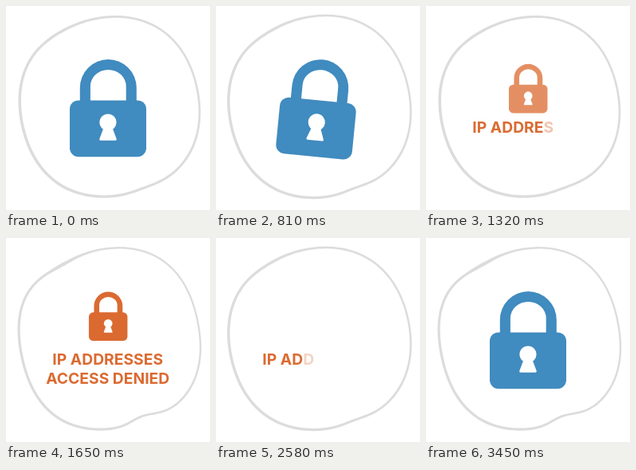
Recreate the animation shown at these times as an HTML page with a canvas. Size 256 px wide and 256 px high, loop 3.48 s.

```html
<!DOCTYPE html>
<html lang="en">
<head>
<meta charset="utf-8">
<title>Access denied</title>
<style>
  html, body { margin: 0; width: 100%; height: 100%; overflow: hidden; background: #fff; }
  canvas { display: block; width: 256px; height: 256px; }
</style>
</head>
<body>
<canvas id="stage"></canvas>
<script>
const LOOP = 3480;
const BLUE = '#408bbf', ORANGE = '#db6a31', GREY = '#dcdcdd';
const LINES = ['IP ADDRESSES', 'ACCESS DENIED'];
const TOTAL = LINES.join('').length;

const canvas = document.getElementById('stage');
const ctx = canvas.getContext('2d');
const dpr = window.devicePixelRatio || 1;
canvas.width = canvas.height = 256 * dpr;

const clamp = v => Math.max(0, Math.min(1, v));
const ramp = (t, a, b) => clamp((t - a) / (b - a));
const rad = deg => deg * Math.PI / 180;
const bump = (deg, at, spread) => Math.exp(-(((deg - at) / spread) ** 2) / 2);

// Four wobbly rings: size, lobe height, depth of the lower right and upper left dents
const rings = [
  { size: 114, lobe: 2, low: 2, high: 1.5, width: 3.1 },
  { size: 115.5, lobe: 2, low: 3, high: 2, width: 3 },
  { size: 115.5, lobe: 2, low: 7, high: 7, width: 3 },
  { size: 115.5, lobe: 3, low: 8, high: 5, width: 2.8 }
];

function drawRing({ size, lobe, low, high, width }) {
  const radius = deg => size
    + lobe * Math.cos(rad(4 * (deg - 33)))
    + 1.3 * Math.cos(rad(deg + 30))
    - low * bump(deg, 66, 9)
    - high * bump(deg, 235, 13);
  const half = deg => (width + 0.5 * Math.cos(rad(deg - 150)) + 0.3 * high * bump(deg, 238, 8)) / 2;

  ctx.beginPath();
  for (const side of [1, -1]) {
    for (let deg = 0; deg < 360; deg += 2) {
      const r = radius(deg) + side * half(deg);
      const x = 129 + r * Math.cos(rad(deg)), y = 127 + r * Math.sin(rad(deg));
      deg ? ctx.lineTo(x, y) : ctx.moveTo(x, y);
    }
    ctx.closePath();
  }
  ctx.fillStyle = GREY;
  ctx.fill('evenodd');
}

function mix(hex, a) {
  const part = i => Math.round(255 + (parseInt(hex.slice(i, i + 2), 16) - 255) * a);
  return `rgb(${part(1)},${part(3)},${part(5)})`;
}

function arch(x, y, rx, ry) {
  ctx.moveTo(x - rx, -5);
  ctx.lineTo(x - rx, y);
  ctx.ellipse(x, y, rx, ry, 0, Math.PI, 2 * Math.PI);
  ctx.lineTo(x + rx, -5);
  ctx.closePath();
}

// Padlock centred on x, y; fades by mixing with white so overlaps stay even
function drawLock(x, y, scale, angle, color, alpha) {
  if (alpha <= 0) return;
  ctx.save();
  ctx.translate(x, y);
  ctx.scale(scale, scale);
  ctx.rotate(rad(angle));

  ctx.fillStyle = mix(color, alpha);
  ctx.beginPath();
  arch(0.3, -25.5, 35.5, 35.5);
  arch(0.3, -27.5, 22.4, 20.5);
  ctx.fill('evenodd');
  ctx.beginPath();
  ctx.roundRect(-48, -9.6, 96, 70.8, 11);
  ctx.fill();

  ctx.fillStyle = ctx.strokeStyle = '#fff';
  ctx.beginPath();
  ctx.arc(0, 18, 10.6, 0, 2 * Math.PI);
  ctx.fill();
  ctx.lineJoin = 'round';
  ctx.lineWidth = 3;
  ctx.beginPath();
  ctx.moveTo(-3.6, 24);
  ctx.lineTo(3.6, 24);
  ctx.lineTo(9.3, 39.3);
  ctx.lineTo(-9.3, 39.3);
  ctx.closePath();
  ctx.fill();
  ctx.stroke();
  ctx.restore();
}

// count may be fractional: the newest letter is partly faded in
function drawText(count) {
  ctx.font = '700 19.3px Inter, Roboto, sans-serif';
  ctx.fillStyle = ORANGE;
  LINES.forEach((text, row) => {
    const x = 127.7 - ctx.measureText(text).width / 2;
    const y = 158.8 + 24 * row;
    const whole = Math.max(0, Math.min(text.length, Math.floor(count)));
    const head = text.slice(0, whole);
    ctx.fillText(head, x, y);
    if (count > 0 && whole < text.length) {
      ctx.globalAlpha = count - whole;
      ctx.fillText(text[whole], x + ctx.measureText(head).width, y);
      ctx.globalAlpha = 1;
    }
    count -= text.length;
  });
}

function shake(t) {
  if (t < 750 || t > 1065) return 0;
  return (5.9 - 0.8 * ramp(t, 750, 1065)) * Math.sin(rad((t - 750) / 210 * 360));
}

function draw(t) {
  ctx.setTransform(dpr, 0, 0, dpr, 0, 0);
  ctx.fillStyle = '#fff';
  ctx.fillRect(0, 0, 256, 256);
  drawRing(rings[Math.floor(t / 150) % rings.length]);

  const blue = t < 2000 ? 1 - ramp(t, 1080, 1170) : ramp(t, 2670, 2760);
  drawLock(128, 128, 1, shake(t), BLUE, blue);

  // The small lock rises while it fades in and sinks while it fades out
  const orange = ramp(t, 1170, 1370) - ramp(t, 2250, 2450);
  drawLock(128.2, 98.2 + 22 * (1 - orange), 0.505, 0, ORANGE, orange);

  drawText(TOTAL * (ramp(t, 1170, 1620) - ramp(t, 2250, 2670)));
}

const start = performance.now();
function tick(now) {
  draw(Math.max(0, now - start) % LOOP);
  requestAnimationFrame(tick);
}
draw(0);
requestAnimationFrame(tick);
</script>
</body>
</html>
```
